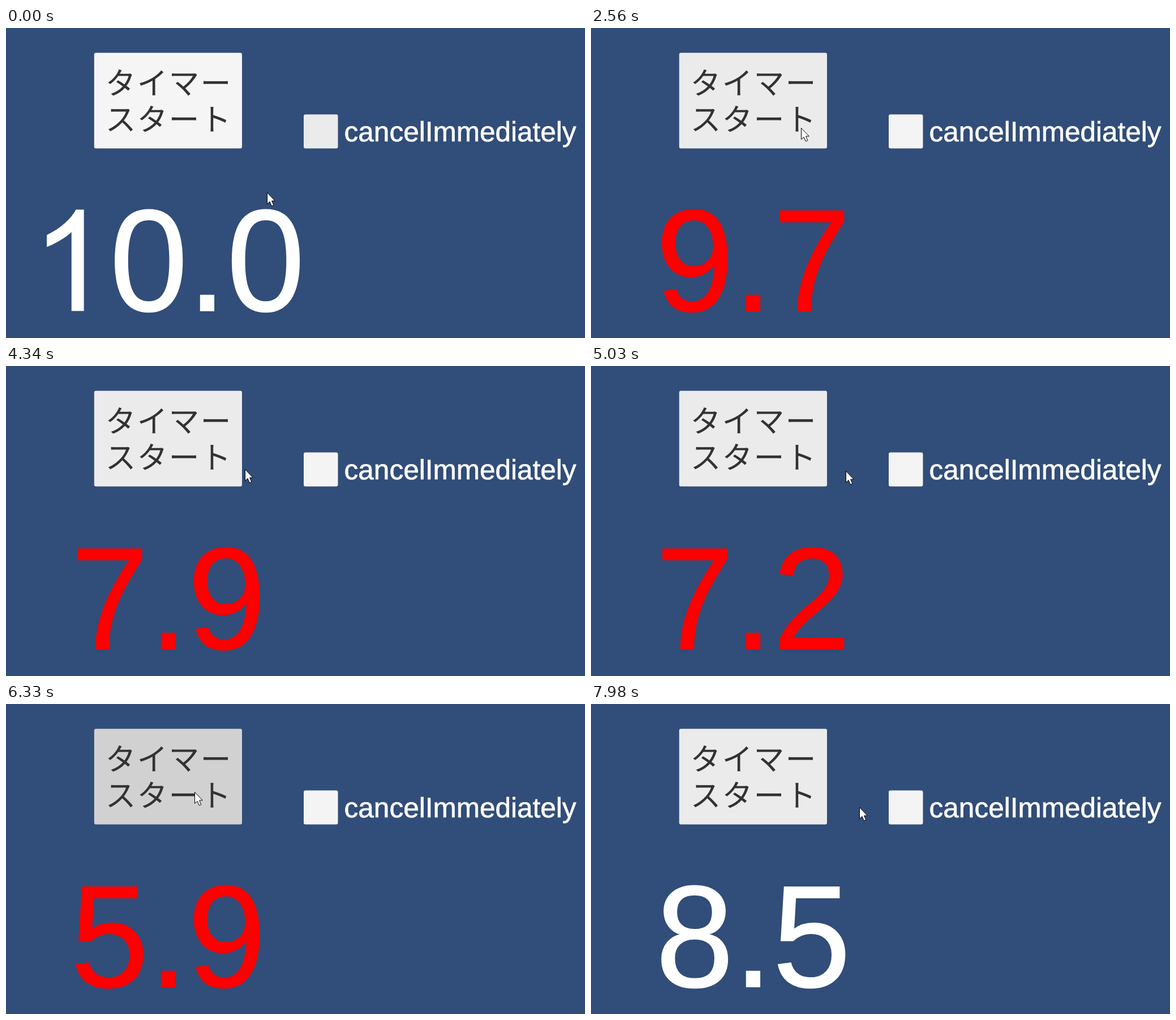
Recreate the animation shown at these times as an HTML page. Size 1023 by 547 pixels, loop 8000 ms.

```html
<!DOCTYPE html>
<html lang="ja">
<head>
<meta charset="utf-8">
<title>Timer</title>
<style>
html, body { margin: 0; width: 100%; height: 100%; overflow: hidden; background: #314d79; }
svg { display: block; width: 100vw; height: 100vh; }
text {
  font-family: "Liberation Sans", Arial, sans-serif;
  font-kerning: none;
  text-rendering: geometricPrecision;
}
.kana { font: 300 54px "Noto Sans CJK JP", "Noto Sans CJK", sans-serif; letter-spacing: 2px; fill: #323232; }
.label { font-size: 49.5px; fill: #fff; stroke: #fff; stroke-width: .7; }
.num { font-size: 248px; stroke-width: 1.6; }
</style>
</head>
<body>
<svg viewBox="0 0 1023 547">
  <rect id="button" x="155.8" y="43.8" width="261.2" height="168.8" rx="3"/>
  <text class="kana" x="175.5" y="117">タイマー</text>
  <text class="kana" x="175.5" y="181">スタート</text>
  <rect id="check" x="526" y="152.5" width="60.5" height="60.1" rx="3"/>
  <text class="label" x="597.6" y="199.8">cancelImmediately</text>
  <g id="count">
    <text id="digits" class="num" transform="scale(1 1.032)"></text>
    <path id="one" d="M763 0H583V1147Q518 1085 412 1023T223 930V1104Q374 1175 487 1276T647 1472H763Z"/>
  </g>
  <path id="cursor" d="M.5 .5V20.5L5 16.4L8.4 24L11.8 22.5L8.6 15H14.3Z" fill="#fff" stroke="#000" stroke-linejoin="round"/>
</svg>
<script>
const LOOP = 8000, EM = 248, MID = 286.5;
const TENTH = 97, FADE = 100;
const el = id => document.getElementById(id);
const [button, check, count, digits, one, cursor] =
  ['button', 'check', 'count', 'digits', 'one', 'cursor'].map(el);

const mix = (a, b, k) => a + (b - a) * k;
const ramp = (t, from, length) => Math.min(1, Math.max(0, (t - from) / length));
const smooth = k => k * k * (3 - 2 * k);
const gray = v => `rgb(${Array(3).fill(Math.round(v))})`;

const clicks = [
  { down: 2010, up: 2310, color: '#f00' },
  { down: 6270, up: 6540, color: '#fff' }
];

const home = [461, 290];
const moves = [
  { from: 340, to: 960, end: [360, 180] },
  { from: 1160, to: 1250, end: [371, 176] },
  { from: 4240, to: 4410, end: [450, 184.7] },
  { from: 5467, to: 5790, end: [333, 155] },
  { from: 7000, to: 7370, end: [474, 182] }
];

function drawPointer(t) {
  const [x, y] = moves.reduce((p, m) => {
    const k = smooth(ramp(t, m.from, m.to - m.from));
    return p.map((v, i) => mix(v, m.end[i], k));
  }, home).map(Math.round);
  cursor.setAttribute('transform', `translate(${x} ${y})`);
}

// the button darkens while held; focus passes from the box to the button
function drawControls(t) {
  const focus = ramp(t, clicks[0].down, FADE);
  const held = clicks.reduce((h, c) => h + ramp(t, c.down, FADE) - ramp(t, c.up, FADE), 0);
  button.setAttribute('fill', gray(mix(mix(245, 235, focus), 192, held)));
  check.setAttribute('fill', gray(mix(235, 244, focus)));
}

let shown = '';
function drawCount(t) {
  const run = clicks.filter(c => c.up <= t).pop() || { up: t, color: '#fff' };
  const s = ((100 - Math.round((t - run.up) / TENTH)) / 10).toFixed(1);
  count.setAttribute('fill', run.color);
  count.setAttribute('stroke', run.color);
  if (s === shown) return;
  shown = s;
  const width = EM * (0.556 * (s.length - 1) + 0.278);
  count.setAttribute('transform', `translate(${MID - width / 2} 499.3)`);
  // the 1 is drawn as a path without a foot
  digits.innerHTML = s.replace('1', '<tspan fill="none" stroke="none">1</tspan>');
  const pos = s.indexOf('1');
  one.style.display = pos < 0 ? 'none' : '';
  one.setAttribute('transform', `translate(${pos > 0 ? 0.834 * EM : 0} 0) scale(.1211 -.1215)`);
}

function draw(now) {
  const t = now % LOOP;
  drawControls(t);
  drawPointer(t);
  drawCount(t);
}

const start = performance.now();
function tick() {
  draw(performance.now() - start);
  requestAnimationFrame(tick);
}
tick();
</script>
</body>
</html>
```
